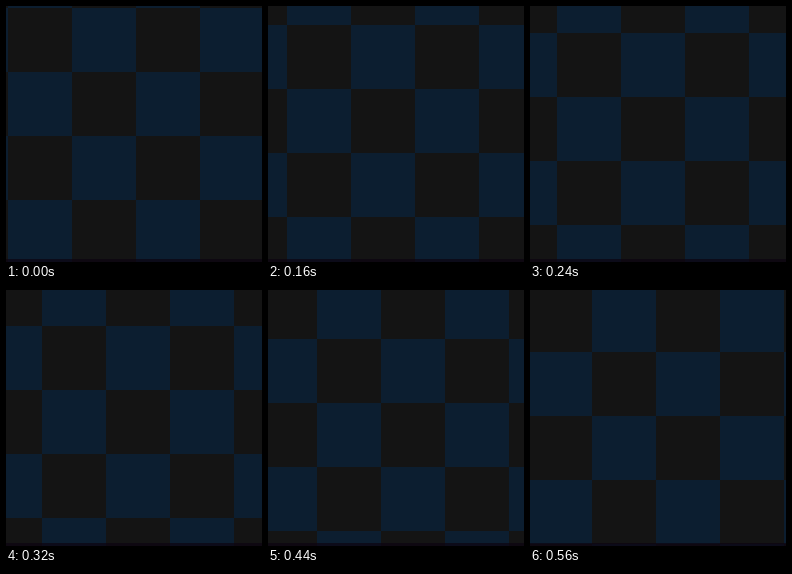
These frames come from a looping animation (256 px wide and 256 px high, 600 ms). An HTML page with a canvas:

```html
<!DOCTYPE html>
<html lang="en">
<head>
<meta charset="utf-8">
<title>Drifting checkerboard</title>
<style>
  html, body { margin: 0; width: 100%; height: 100%; overflow: hidden; background: #141414; }
  canvas { display: block; width: 256px; height: 256px; }
</style>
</head>
<body>
<canvas id="stage" width="256" height="256"></canvas>
<script>
const SIZE = 256, TILE = 64, LOOP = 600, STEP = 40, START = 1.8;
const ctx = document.getElementById('stage').getContext('2d');

function draw(time) {
  const step = Math.floor((time % LOOP) / STEP);
  const offset = Math.round(START + TILE * step * STEP / LOOP);

  ctx.fillStyle = '#141414';
  ctx.fillRect(0, 0, SIZE, SIZE);
  ctx.fillStyle = '#0c1e30';
  for (let row = -1; row < 4; row++) {
    for (let col = -1; col < 4; col++) {
      if ((row + col) & 1) ctx.fillRect(offset + col * TILE, offset + row * TILE, TILE, TILE);
    }
  }

  // Dark rim along the bottom
  ctx.fillStyle = 'rgba(12, 4, 16, 0.7)';
  ctx.fillRect(0, SIZE - 3, SIZE, 3);
}

function tick() {
  draw(performance.now());
  requestAnimationFrame(tick);
}
tick();
</script>
</body>
</html>
```
